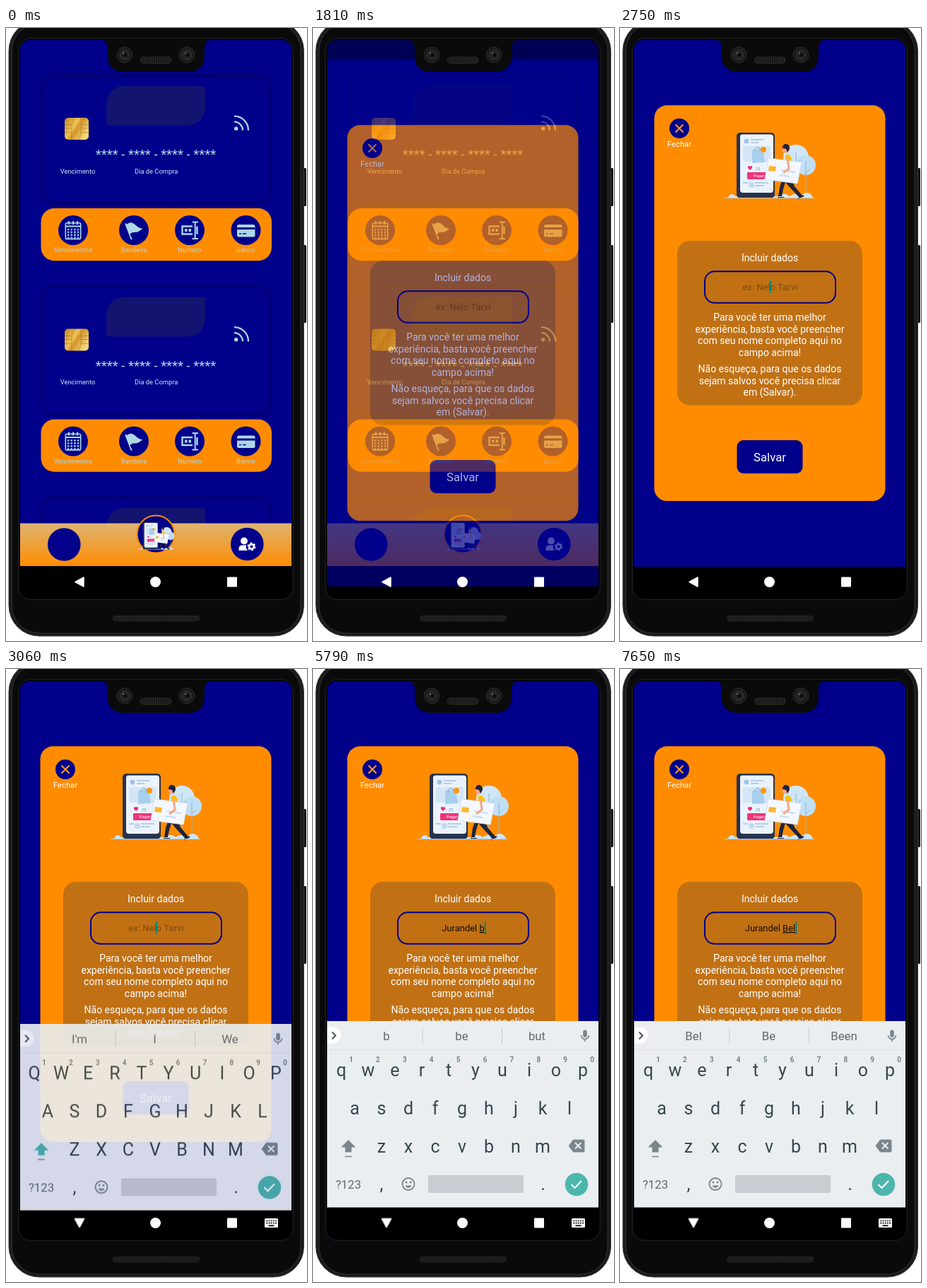
Write an HTML page that moves like this. It is 426x867 px and loops after 8 s.

```html
<!DOCTYPE html>
<html lang="pt">
<head>
<meta charset="utf-8">
<title>Cartões</title>
<style>
html, body { margin: 0; width: 100%; height: 100%; overflow: hidden; background: #fff; }
svg { display: block; width: 100vw; height: 100vh; font-family: Roboto, sans-serif; }
text { text-anchor: middle; white-space: pre; }
.pale { fill: #add8e6; }
.line { fill: none; stroke: #add8e6; }
.small { font-size: 9.35px; fill: #add8e6; }
.bright { fill: #cfe6f0; }
.body { font-size: 14px; fill: #fff; }
.navy { fill: #00008b; }
.orange { fill: #ff8c00; }
.grey { fill: #7b868c; }
.key { font-size: 25px; fill: #37474f; }
.digit { font-size: 10px; font-weight: 500; fill: #66727a; }
.word { font-size: 16.8px; fill: #5f6a70; }
.left { text-anchor: start; }
.shadow { filter: drop-shadow(0 0 3.5px rgba(0, 0, 0, .55)); }

#settings, #modal, #strip, #picture, #keyboard, #back, #switcher, #caret {
  animation: 8s step-end infinite;
}
#settings { animation-name: press; }
#modal { animation-name: modal; }
#strip { animation-name: strip; }
#picture { animation-name: picture; }
#keyboard { animation-name: keyboard; }
#back { animation-name: turn; transform-origin: 104px 783.5px; }
#switcher { animation-name: switcher; }
#caret { animation-name: caret; }
@keyframes press { 0% { opacity: 1 } 6.25% { opacity: .2 } 21.75% { opacity: .65 } 22.625% { opacity: 1 } }
@keyframes modal {
  0% { opacity: 0; transform: translateY(28px) }
  22.625% { opacity: .7; transform: translateY(28px) }
  23.625% { opacity: 1; transform: translateY(28px) }
  24.625% { opacity: 1; transform: none }
}
@keyframes strip { 0% { opacity: 0 } 22.625% { opacity: 1 } 24.625% { opacity: 0 } }
@keyframes picture { 0% { opacity: 0 } 23.625% { opacity: .58 } 24.625% { opacity: .85 } 25.5% { opacity: 1 } }
@keyframes keyboard {
  0% { opacity: 0; transform: translateY(40px) }
  36.375% { opacity: .2; transform: translateY(32px) }
  37.25% { opacity: .6; transform: translateY(13px) }
  38.25% { opacity: .91; transform: translateY(4.3px) }
  39.25% { opacity: 1; transform: translateY(1px) }
  40.125% { opacity: 1; transform: none }
}
@keyframes turn { 0% { transform: none } 35.375% { transform: rotate(-90deg) } }
@keyframes switcher { 0% { opacity: 0 } 35.375% { opacity: 1 } }
@keyframes caret {
  0% { opacity: 0 } 34.375% { opacity: 1 } 41.125% { opacity: 0 }
  48% { opacity: 1 } 82.125% { opacity: 0 } 84.125% { opacity: 1 }
}
</style>
</head>
<body>
<svg viewBox="0 0 426 867">
  <defs>
    <clipPath id="screen"><rect x="20" y="17" width="384" height="789" rx="14"/></clipPath>
    <linearGradient id="tabs" x2="0" y2="1">
      <stop stop-color="#deb473"/><stop offset="1" stop-color="#ff8c00"/>
    </linearGradient>
    <linearGradient id="gold" x2="1" y2=".6">
      <stop stop-color="#c08420"/><stop offset=".45" stop-color="#f0c455"/>
      <stop offset=".6" stop-color="#d2962c"/><stop offset="1" stop-color="#f6d878"/>
    </linearGradient>
    <pattern id="mesh" width="3" height="3" patternUnits="userSpaceOnUse">
      <rect width="3" height="3" fill="#111"/><circle cx="1.5" cy="1.5" r=".9" fill="#383838"/>
    </pattern>
    <pattern id="days" x="86.7" y="283.6" width="4.7" height="4" patternUnits="userSpaceOnUse">
      <rect width="2.6" height="2.4" rx=".6" class="pale"/>
    </pattern>

    <g id="card">
      <rect class="navy shadow" x="53.5" y="69" width="318.5" height="177" rx="14"/>
      <path d="M167 82H278a4 4 0 0 1 4 4V113a25 25 0 0 1-25 25H146a4 4 0 0 1-4-4V107a25 25 0 0 1 25-25" fill="#131370"/>
      <rect x="83" y="127" width="34" height="31" rx="5" fill="url(#gold)"/>
      <path d="M83 137H93V148H83M93 148V158M93 137L97 127M117 137H106V148H117M106 148L103 158M106 137V127M93 142H83M106 142H117" fill="none" stroke="#a87426" stroke-width=".6"/>
      <circle class="pale" cx="325.7" cy="142.3" r="2.7"/>
      <path class="line" stroke-width="2.3" d="M323 132.7a12 12 0 0 1 12 12M323 124.7a20 20 0 0 1 20 20"/>
      <text class="pale" x="212" y="185" font-size="18.5">**** - **** - **** - ****</text>
      <text class="small bright left" x="76.7" y="205.5">Vencimento</text>
      <text class="small bright left" x="182" y="205.5">Dia de Compra</text>
      <rect class="orange" x="49.5" y="255" width="326.5" height="74.3" rx="19"/>
      <g class="navy">
        <circle cx="95" cy="286" r="21"/><circle cx="181" cy="286" r="21"/>
        <circle cx="260" cy="286" r="21"/><circle cx="339.5" cy="286" r="21"/>
      </g>
      <rect class="line" x="84.3" y="275.8" width="21.4" height="22.6" rx="2" stroke-width="1.6"/>
      <path class="line" stroke-width="2" d="M84 280.5H106M89 273V278M95 273V278M101 273V278"/>
      <rect x="86.7" y="283.6" width="17" height="14" fill="url(#days)"/>
      <path class="pale" d="M168.300 277l1.800-.9 1 1.700c4-3.600 7-2.600 9.900-1.100 4 2.200 5 6.300 12.500 6.800-3 2-4.500 4-7.500 5-4 1-8-.8-10.500 3.500l3.300 6.500-2 .9z"/>
      <path class="line" stroke-width="2.4" d="M264 280.500H249.500V291.500H264M270.500 280.500V291.500"/>
      <path class="line" stroke-width="2" d="M263.500 274.500H272M267.700 274.500V298M263.500 298H272"/>
      <path class="pale" d="M253 284h3.500v4H253zM258.500 284H262v4h-3.500z"/>
      <rect class="pale" x="327" y="278" width="25.5" height="17.5" rx="2.5"/>
      <path d="M327 283.5H352.500" stroke="#00008b" stroke-width="3"/>
      <path d="M330 291H333M335 291H340" stroke="#00008b" stroke-width="1.5"/>
      <text class="small" x="95" y="317">Vencimentos</text>
      <text class="small" x="181" y="317">Bandeira</text>
      <text class="small" x="260" y="317">Número</text>
      <text class="small" x="339.5" y="317">Banco</text>
    </g>

    <g id="shop">
      <circle cx="249" cy="183" r="18" fill="#cfe6f6"/><circle cx="263" cy="194" r="14" fill="#c0dff4"/>
      <path d="M249 176V240M263 188V240M249 193l7-7M263 205l6-6" fill="none" stroke="#8fb4cf"/>
      <path d="M153 240c2-5 6-7 10-2h62c5-5 10-4 15 0 6-4 12-5 17-1 5-7 14-4 16 3z" fill="#cfe6f6"/>
      <rect x="165" y="148" width="54" height="92.500" rx="5" fill="#28324c"/>
      <path d="M172 150.500H213a4 4 0 0 1 4 4V229a4 4 0 0 1-4 4H174a4 4 0 0 1-4-4V152.500z" fill="#eaf3fc"/>
      <circle cx="179" cy="160" r="3.5" fill="#9fc4e8"/>
      <path d="M185 158H203M185 162H196M174 219H181M191 219H210M191 223H204" stroke="#b5cde4" stroke-width="1.8"/>
      <path d="M174 167H213V189H174z" fill="#d4e6f6"/>
      <path d="M187 172l15-2 3 20-18 1z" fill="#a8cfee"/><path d="M191 173c1-6 7-6 7-1" fill="none" stroke="#7298bd"/>
      <circle cx="203" cy="172" r="4" fill="#ff9800"/><circle cx="186" cy="222" r="4" fill="#c3daee"/>
      <path d="M184 201l-3-3c-1-3 2-4 3-2 1-2 4-1 3 2z" fill="#ed2c76"/>
      <text x="195" y="201" font-size="6" fill="#7593b2">25</text>
      <rect x="180" y="204" width="33" height="10" rx="1" fill="#f0347c"/>
      <text x="196.5" y="211.3" font-size="6" fill="#fff">Pagar</text>
      <path d="M230 213l12-2 5 13 11 13-4 3-13-14-7-8-3 10-2 10h-5l2-13z" fill="#20233b"/>
      <path d="M223 240h9M252 241l8-4" stroke="#20233b" stroke-width="2"/>
      <path d="M234 180q6-3 9 4l2 27-12 3z" fill="#ffc107"/>
      <circle cx="234.5" cy="172" r="4.8" fill="#f4a58a"/>
      <path d="M230 170c0-9 11-7 10 1l-3 5-2-5z" fill="#20233b"/>
      <path d="M210 184l47 6-6 30-46-6z" fill="#f4f8fe" stroke="#d4e3f2"/>
      <path d="M211 195l10 1-1 7-10-1z" fill="#ffb52d"/><path d="M228 201l20 3M226 208l14 2" stroke="#c6dcf0" stroke-width="2"/>
      <path d="M237 184l2 15-8 6" fill="none" stroke="#f4a58a" stroke-width="3"/>
      <path d="M148 240.5H275" stroke="#a9cde9"/>
    </g>
  </defs>

  <g fill="#111"><rect x="419" y="198" width="6" height="54" rx="1.5"/><rect x="419" y="307" width="6" height="110" rx="1.5"/></g>
  <rect x="4" y="-11" width="417.5" height="871" rx="43" fill="#1b1b1b" stroke="#3b3b3b"/>
  <rect x="8.5" y="-7" width="408.5" height="863" rx="39" fill="#0a0a0a" stroke="#303030"/>
  <rect x="17.5" y="14.5" width="389" height="794" rx="17" fill="#050505" stroke="#222"/>

  <g clip-path="url(#screen)">
    <rect class="navy" width="426" height="867"/>
    <use href="#card"/><use href="#card" y="298.5"/><use href="#card" y="597"/>
    <rect x="20" y="700.5" width="384" height="61" fill="url(#tabs)"/>
    <circle class="navy" cx="82.3" cy="730.5" r="23.3"/>
    <circle class="navy" cx="212" cy="716" r="26.5" stroke="#ff8c00" stroke-width="2"/>
    <use href="#shop" transform="translate(127.8 636.8) scale(.4 .42)"/>
    <g id="settings">
      <circle class="navy" cx="341.3" cy="730" r="23.3"/>
      <circle cx="337" cy="725.5" r="5" fill="#fff"/>
      <path d="M329.500 739v-2.500q0-5 5-5h5.500q-1 4 2 7.500z" fill="#fff"/>
      <circle cx="347.5" cy="733.5" r="3.3" fill="none" stroke="#fff" stroke-width="2.6"/>
      <circle cx="347.5" cy="733.5" r="5" fill="none" stroke="#fff" stroke-width="2" stroke-dasharray="2.6 2.636"/>
    </g>
    <rect x="20" y="761" width="384" height="46"/>

    <rect id="strip" x="20" y="17" width="384" height="29" fill="#000055"/>
    <g id="modal">
      <rect class="navy" x="20" y="17" width="384" height="745"/>
      <rect class="orange" x="48.5" y="109.3" width="327" height="559.7" rx="18"/>
      <circle class="navy" cx="84" cy="142" r="14"/>
      <path d="M78.500 136.500l11 11m0-11l-11 11" stroke="#ff9a2a" stroke-width="2"/>
      <text x="84" y="168" font-size="11.2" fill="#fff">Fechar</text>
      <use id="picture" href="#shop"/>
      <rect x="81" y="301" width="262" height="232.5" rx="18" fill="#c17114"/>
      <rect x="120" y="344.3" width="185" height="44.5" rx="14" fill="none" stroke="#00008b" stroke-width="2"/>
      <text class="body" x="212" y="329.5">Incluir dados</text>
      <text id="hint" x="212.5" y="371" font-size="13.1" fill="#804a0b">ex: Nelo Tarvi</text>
      <text id="field" x="212.5" y="371" font-size="13" fill="#170d02"><tspan></tspan><tspan text-decoration="underline"></tspan></text>
      <rect id="caret" x="212" y="357" width="2" height="18" fill="#0d8577"/>
      <g id="lines" class="body"></g>
      <rect class="navy" x="165.5" y="583" width="93" height="47" rx="9"/>
      <text x="212" y="612.8" font-size="16.8" fill="#fff">Salvar</text>
    </g>

    <g id="keyboard">
      <rect x="20" y="498" width="384" height="263.5" fill="#eaeef1"/>
      <path d="M20 538.5H404" stroke="#dde2e5"/>
      <path d="M155 507V530M267.500 507V530" stroke="#c6ccd0"/>
      <path d="M20 506.500H28a11.500 11.500 0 0 1 0 23H20z" fill="#fff"/>
      <path d="M27 513.500l5 5-5 5" fill="none" stroke="#4c575d" stroke-width="2"/>
      <rect class="grey" x="382.3" y="510.5" width="5.5" height="10.5" rx="2.75"/>
      <path d="M379.500 518a5.500 5.500 0 0 0 11 0M385 523.500V527" fill="none" stroke="#7b868c" stroke-width="1.6"/>
      <g id="words"></g>
      <g id="keys"></g>
      <path id="shift" class="grey" d="M50 666l10.500 10.500H54.500V683.500H45.500V676.500H39.500z"/>
      <path d="M45 689.500H55" stroke="#7b868c" stroke-width="1.5"/>
      <path class="grey" d="M361.500 674.500l6-8q.7-1 2-1H382q2.500 0 2.500 2.500V681q0 2.500-2.500 2.500H369.500q-1.300 0-2-1z"/>
      <path d="M371 670l8.500 8.500m0-8.500l-8.500 8.500" stroke="#eaeef1" stroke-width="2"/>
      <text class="word" x="50" y="735">?123</text>
      <text class="key" x="97" y="737">,</text>
      <text class="key" x="325.5" y="737">.</text>
      <circle cx="135" cy="728.5" r="8.5" fill="none" stroke="#7b868c" stroke-width="1.8"/>
      <path d="M130.500 730.500a4.800 4.800 0 0 0 9 0z" class="grey"/>
      <circle class="grey" cx="132" cy="726" r="1.4"/><circle class="grey" cx="138" cy="726" r="1.4"/>
      <rect x="163" y="716" width="135" height="25" rx="2" fill="#c9cdd1"/>
      <circle cx="373" cy="729" r="16.3" fill="#4db6ac"/>
      <path d="M365.500 729l5 5 9.500-10" fill="none" stroke="#fff" stroke-width="2"/>
    </g>

    <g fill="#fff">
      <path id="back" d="M98 783.500L110 777V790z" stroke="#fff" stroke-width="1.5" stroke-linejoin="round"/>
      <circle cx="211.5" cy="783.5" r="7.5"/>
      <rect x="313" y="776.5" width="14" height="14" rx="1"/>
      <g id="switcher">
        <rect x="366" y="777" width="19" height="13" rx="1.5"/>
        <path d="M368.500 780.500H383M368.500 783.700H383" stroke="#000" stroke-width="1.7" stroke-dasharray="1.8 1.35"/>
        <path d="M371.500 787.300H379.500" stroke="#000" stroke-width="1.7"/>
      </g>
    </g>
  </g>

  <path d="M130 16q14 0 14 13V39q0 23 23 23H258q23 0 23-23V29q0-13 14-13z" fill="#0a0a0a"/>
  <g id="cameras"></g>
  <rect x="190" y="41" width="44" height="9" rx="4.5" fill="url(#mesh)" stroke="#292929"/>
  <rect x="151" y="831" width="123" height="8" rx="4" fill="url(#mesh)" stroke="#1c1c1c"/>
</svg>
<script>
const $ = id => document.getElementById(id);

function add(parent, tag, attrs, content = '') {
  const node = document.createElementNS($('lines').namespaceURI, tag);
  for (const name in attrs) node.setAttribute(name, attrs[name]);
  node.textContent = content;
  return $(parent).appendChild(node);
}

for (const cx of [168, 256]) {
  add('cameras', 'circle', { cx, cy: 38, r: 11, fill: '#1a1a1a', stroke: '#2c2c2c' });
  add('cameras', 'circle', { cx, cy: 38, r: 6.5, fill: '#222', stroke: '#383838' });
  add('cameras', 'circle', { cx: cx + 1, cy: 38, r: 2.5, fill: '#0b0b0b' });
  add('cameras', 'circle', { cx: cx - 2, cy: 35.5, r: 1, fill: '#888' });
}

const paragraphs = [
  [414, 'Para você ter uma melhor', 'experiência, basta você preencher', 'com seu nome completo aqui no', 'campo acima!'],
  [487, 'Não esqueça, para que os dados', 'sejam salvos você precisa clicar', 'em (Salvar).']
];
for (const [top, ...lines] of paragraphs)
  lines.forEach((line, i) => add('lines', 'text', { x: 212, y: top + i * 16.6 }, line));

const rows = [['qwertyuiop', 40, 575.5], ['asdfghjkl', 59, 629.5], ['zxcvbnm', 97, 684]];
const keys = rows.flatMap(([letters, x, y]) =>
  [...letters].map((letter, i) => add('keys', 'text', { class: 'key', x: x + i * 38, y }, letter)));
for (let i = 0; i < 10; i++)
  add('keys', 'text', { class: 'digit', x: 54 + i * 37.9, y: 555.5 }, (i + 1) % 10);
const words = [104, 210.5, 317].map(x => add('words', 'text', { class: 'word', x, y: 524.5 }));

// time, typed text, suggestions, capitals
const steps = [
  [0, '', "I'm I We", true],
  [4240, '', 'J Just Join'],
  [4310, 'J', 'J Just Join'],
  [4480, 'J', 'Ju Just July'],
  [4550, 'Ju', 'Ju Just July'],
  [4720, 'Ju', 'Jur Jury Just'],
  [4800, 'Jur', 'Jur Jury Just'],
  [4870, 'Jur', 'Jura Jury Just'],
  [4950, 'Jura', 'Jura Jury Just'],
  [5030, 'Jura', 'Juran Jury Just'],
  [5100, 'Juran', 'Juran Jury Just'],
  [5180, 'Juran', 'Jurand Jury Just'],
  [5260, 'Jurand', 'Jurand Jury Just'],
  [5410, 'Jurande', 'Jurande Jury Just'],
  [5490, 'Jurandel', 'Jurandel Jury Just'],
  [5560, 'Jurandel ', 'I is and'],
  [5790, 'Jurandel b', 'b be but'],
  [5950, 'Jurandel b', 'be been better'],
  [6030, 'Jurandel be', 'bel be been'],
  [6100, 'Jurandel bel', 'bel be been'],
  [6730, 'Jurandel be', 'bel be been'],
  [6880, 'Jurandel be', 'be been better'],
  [6960, 'Jurandel b', 'b be but'],
  [7110, 'Jurandel ', 'I is and'],
  [7260, 'Jurandel ', 'I Is And', true],
  [7340, 'Jurandel ', 'B Be But'],
  [7420, 'Jurandel B', 'B Be But'],
  [7570, 'Jurandel Be', 'Be Been But'],
  [7650, 'Jurandel Bel', 'Bel Be Been']
];

function show([, typed, hints, caps]) {
  const field = $('field');
  const split = typed.lastIndexOf(' ') + 1;
  field.children[0].textContent = typed.slice(0, split);
  field.children[1].textContent = typed.slice(split);
  $('hint').style.visibility = typed ? 'hidden' : 'visible';
  $('caret').setAttribute('x', typed ? 212.5 + field.getComputedTextLength() / 2 : 212);
  hints.split(' ').forEach((hint, i) => { words[i].textContent = hint; });
  for (const key of keys)
    key.textContent = caps ? key.textContent.toUpperCase() : key.textContent.toLowerCase();
  $('shift').style.fill = caps ? '#4db6ac' : '';
}

let start, current;
function tick(now) {
  start ??= now;
  const time = (now - start) % 8000;
  const step = steps.findLast(([at]) => at <= time);
  if (step !== current) show(current = step);
  requestAnimationFrame(tick);
}
show(steps[0]);
requestAnimationFrame(tick);
</script>
</body>
</html>
```
